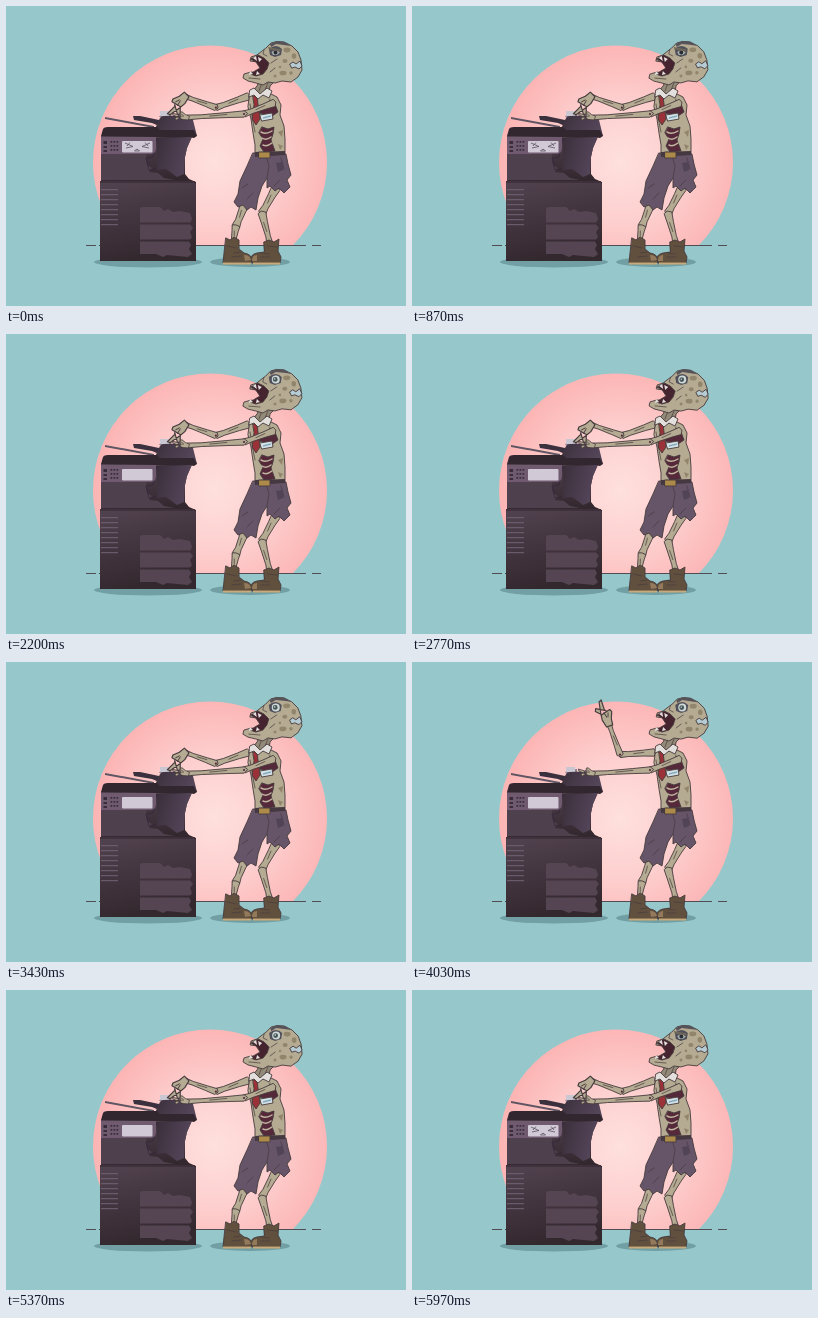
Animation of 400x300 px, one loop 6.11 s. Source, as an HTML page:

```html
<!DOCTYPE html>
<html lang="en">
<head>
<meta charset="utf-8">
<title>Zombie at the copier</title>
<style>
html, body { margin: 0; width: 100%; height: 100%; overflow: hidden; background: #96c8cb; }
svg { display: block; width: 100vw; height: 100vh; }
.ink { stroke: #463b3d; stroke-width: .9; stroke-linejoin: round; stroke-linecap: round; }
.skin { fill: #b5aa92; }
.line { fill: none; stroke: #463b3d; stroke-width: .7; stroke-linecap: round; stroke-linejoin: round; }
.wound { fill: #55293a; }
.bone { fill: #e2dfdc; }
.cloth { fill: #665469; }
.boot { fill: #62503f; }
.spot { fill: #91866b; }
</style>
</head>
<body>
<svg viewBox="0 0 400 300" xmlns="http://www.w3.org/2000/svg">
  <defs>
    <radialGradient id="sun" gradientUnits="userSpaceOnUse" cx="208" cy="156" r="118">
      <stop offset="0" stop-color="#fee0dd"/><stop offset=".5" stop-color="#fdd0cf"/><stop offset="1" stop-color="#fcb5b5"/>
    </radialGradient>
    <linearGradient id="cabinet" x1="0" x2=".25" y1="0" y2="1">
      <stop offset="0" stop-color="#524350"/><stop offset=".5" stop-color="#43353f"/><stop offset="1" stop-color="#34282f"/>
    </linearGradient>
    <linearGradient id="feeder" x1="0" x2="1" y1="0" y2=".3">
      <stop offset="0" stop-color="#3b2f3b"/><stop offset="1" stop-color="#55465a"/>
    </linearGradient>
    <clipPath id="horizon"><rect width="400" height="240"/></clipPath>
  </defs>

  <rect width="400" height="300" fill="#96c8cb"/>
  <circle cx="204" cy="156.5" r="117" fill="url(#sun)" clip-path="url(#horizon)"/>
  <path d="M80 239.5H90M93 239.5H300M306 239.5H315" stroke="#504c54" stroke-width="1.2"/>
  <g fill="#719fa4">
    <ellipse cx="142" cy="256" rx="54" ry="5.5"/>
    <ellipse cx="244" cy="256" rx="40" ry="5"/>
  </g>

  <g id="copier">
    <g id="lid">
      <path d="M127 110L134 110 153 114V120L146 117 128 114Z" fill="#3b303d"/>
      <path d="M99 111L148 120V122L99 113Z" fill="#5f5562"/>
      <path d="M153 111L155 108 165 107 165 112Z" fill="#8c8292"/>
      <path d="M154 105H163V110H154Z" fill="#c9c7d2"/>
      <path d="M148 125L154 112Q155 110 158 110L182 109Q186 110 187 114L191 130 150 131Z" fill="url(#feeder)"/>
    </g>
    <path d="M95 130H186L181 142 179 151V168L183 173 190 176V179H95Z" fill="url(#cabinet)"/>
    <path d="M95 130L97 123Q98 121 102 121H151L154 124H188L191 130 188 132 182 131 178 133 152 131Z" fill="#32272f"/>
    <path d="M151 132L186 131 181 142 179 151 178 168 171 171 160 163 151 164Z" fill="url(#feeder)"/>
    <path d="M95 147H140L141 159 146 162 143 166 152 167 158 172 168 174H95Z" fill="#4e404d"/>
    <path d="M151 132L147 151 140 152 143 164 150 163" fill="none" stroke="#33283a" stroke-width=".8"/>
    <path d="M94 175H188L190 178V255H94Z" fill="url(#cabinet)"/>
    <path d="M94 176H189" stroke="#30252e" stroke-width="1.2"/>
    <g id="vents" stroke="#716374" stroke-width="1"/>
    <g fill="#554552">
      <path d="M134 203Q134 201 137 201H154L158 205 162 203 167 206 174 205 184 207 186 213 184 216.5H134Z"/>
      <path d="M134 218.5H184L187 222 184 226 186 231 184 233.5H134Z"/>
      <path d="M134 235.5H183L185 239 183 243 186 248 182 251 161 249 157 251 150 248 134 248Z"/>
    </g>
    <path d="M95 131H150V142Q150 148 144 148H95Z" fill="#6f5a6f"/>
    <g id="keys" fill="#392d3c"/>
    <rect x="116" y="135" width="30.5" height="11.5" rx="1" fill="#d1cad6"/>
    <g id="screenFace" fill="none" stroke="#5b4f60" stroke-width=".8">
      <path d="M119 137L127 140.5L120 142M124 136.5L121 140M144 137L136 140.5L143 142M139 136.5L142 140M128.5 145Q131 141.5 133.5 145Z"/>
    </g>
  </g>

  <g id="farArm"></g>

  <g id="zombie">
    <g id="legs"></g>
    <g>
      <path class="boot ink" d="M220 232L224 234 228 231 233 234 233 243 238 247Q246 248 246 255L245 257H217L218 247Z"/>
      <path class="boot ink" d="M258 236L263 234 268 236 273 233 272 245 275 251 274 257H246Q242 249 251 247L258 246Z"/>
      <path d="M217 257.5H245M247 257.5H274" stroke="#c8aa7b" stroke-width="1.8"/>
      <path d="M238 249Q244 249 245 254L239 255ZM251 249Q246 249 246 255L251 255Z" fill="#937a5b"/>
      <path class="line" d="M221 240L230 242M228 247L235 246M226 251L235 250M262 240L271 241M256 247L263 248M255 251L264 251"/>
    </g>

    <path class="cloth ink" d="M247 147L280 148 282 158 285 169 281 174 284 181 278 187 273 182 269 185 264 180 261 182 261 172 256 180 252 192 250 204 245 201 241 204 237 199 232 201 228 196 232 188 234 175 241 160Z"/>
    <path class="line" d="M261 172L263 160 261 153M236 182L242 178M268 180L274 174M275 152L278 163M241 193L247 187"/>
    <path d="M270 157L277 156 277 164 272 166Z" fill="#514457"/>

    <path class="skin ink" d="M244 88L263 87 271 91 275 99 274 109 278 120 279 133 279 148 249 148 249 139 247 127 245 113 242 101Z"/>
    <path class="wound ink" d="M255 102L269 98 272 106 266 110 253 107ZM256 121L262 123 268 121 267 128 265 134 269 145 258 146 254 140 257 133 253 127Z"/>
    <g fill="none" stroke="#c0b49f" stroke-width="1.5" stroke-linecap="round">
      <path d="M255 126Q260 129 266 125M256 132Q260 135 265 131M257 139Q261 141 266 137"/>
    </g>
    <path class="spot" d="M272 126L277 124 276 131ZM272 138L277 140 274 144Z"/>
    <path d="M254 109L266 107 267 113 256 115Z" fill="#d7e2e8" class="ink"/>
    <path d="M257 112L265 110" stroke="#82aabd" stroke-width="1.5"/>
    <path d="M249 146L279 145V149L249 151Z" fill="#463840"/>
    <path d="M253 146H264V152H253Z" fill="#ad8a49" class="ink"/>
    <path d="M247 90L251 90 252 98 254 113 250 119 246 113 248 99Z" fill="#9b3237" class="ink"/>
    <path class="line" d="M244 98L247 116 249 126M264 93L262 100"/>

    <g id="head">
      <path d="M254 74L269 75 264 80 263 87 254 90 246 86 251 80Z" fill="#948a78" class="ink"/>
      <path class="line" d="M256 77L253 85M262 77L259 84"/>
      <path class="skin ink" d="M260 42L265 37 271 35.5 278 36 286 40 292 46 295 54 296 64 292 71 285 76 276 75 269 77 262 76 257 79 250 77 242 75 237 72 238 68 245 66 252 67 256 62 251 56 244 55 245 51 251 49 256 45Z"/>
      <path d="M245 53L252 49 258 52 263 57 261 63 257 68 250 70 244 68 249 65 254 62 250 56Z" fill="#45232f" class="ink"/>
      <path d="M247 52L250 50 251 55ZM252 51L256 53 253 56ZM243 69L244 65 247 68ZM250 69L251 65 254 68Z" class="bone"/>
      <path class="line" d="M258 44L257 48 261 50M264 66L269 62M265 57L271 53M243 72L254 73"/>
      <g class="spot">
        <ellipse cx="281" cy="44" rx="3.5" ry="2.4"/><ellipse cx="288" cy="50" rx="2.3" ry="2.8"/>
        <ellipse cx="279" cy="55" rx="2.5" ry="2"/><ellipse cx="277" cy="67" rx="3.5" ry="2.3"/>
        <circle cx="285" cy="67" r="1.7"/><circle cx="269" cy="70" r="1.5"/><circle cx="274" cy="61" r="1.3"/>
      </g>
      <path d="M264 38L271 35 279 36 285 40 278 39 270 38 265 41Z" fill="#56535a"/>
      <path d="M284 58L287 56 290 58 294 55 296 60 293 63 289 61 286 62Z" fill="#b6ccd5" class="ink"/>
      <path d="M263 43Q270 37 276 43L275 49 269 51 264 49Z" fill="#50505a"/>
      <g id="openEye">
        <circle cx="270" cy="45.5" r="4" fill="#cfdad7"/><circle cx="269.5" cy="45.5" r="2.4" fill="#46555a"/>
        <circle cx="269" cy="45" r=".7" fill="#fff"/>
      </g>
      <g id="squint">
        <path d="M265.5 46Q270 43 274 46.5L271 49 267 49Z" fill="#a8b1ac"/><circle cx="269.5" cy="46.5" r="2" fill="#292b35"/>
        <path d="M262 41L275 43.5 274 45.5 263 43.5Z" fill="#6f6759"/>
      </g>
    </g>
    <path class="bone ink" d="M244 84L248 82 254 88 261 82 266 85 263 92 257 89 252 93 248 89 243 91Z"/>
  </g>
  <g id="nearArm"></g>
</svg>
<script>
const LOOP = 6110;
const $ = id => document.getElementById(id);
const clamp = x => Math.max(0, Math.min(1, x));
const ease = x => x * x * (3 - 2 * x);
const ramp = (t, from, to) => ease(clamp((t - from) / (to - from)));
const mix = (a, b, k) => a + (b - a) * k;
const polar = ([x, y], deg, r) => [x + r * Math.cos(deg * Math.PI / 180), y + r * Math.sin(deg * Math.PI / 180)];
const show = (id, on) => $(id).setAttribute('visibility', on ? 'visible' : 'hidden');

$('vents').innerHTML = Array.from({ length: 8 }, (_, i) => `<path d="M95 ${183.7 + i * 5}H112"/>`).join('');
$('keys').innerHTML = Array.from({ length: 9 }, (_, i) =>
  `<rect x="${104.5 + i % 3 * 3}" y="${135 + Math.floor(i / 3) * 4}" width="1.7" height="1.7"/>`).join('') +
  '<path d="M97.500 135H101V138H97.500ZM97.500 140H101V142H97.500ZM97.500 144H101V146H97.500Z"/>';

// Tapered bone, wider at each joint, from a to b.
function bone(a, b, w1, w2) {
  const dir = Math.atan2(b[1] - a[1], b[0] - a[0]), nx = -Math.sin(dir), ny = Math.cos(dir);
  const at = (k, w) => [mix(a[0], b[0], k) + nx * w, mix(a[1], b[1], k) + ny * w].map(v => v.toFixed(2)).join(' ');
  return `<path class="skin ink" d="M${at(0, w1)}L${at(.3, w1 * .8)}L${at(.75, w2 * .75)}L${at(1, w2)}L${at(1.04, 0)}` +
    `L${at(1, -w2)}L${at(.75, -w2 * .8)}L${at(.3, -w1 * .8)}L${at(0, -w1)}L${at(-.06, 0)}Z"/>` +
    `<path class="line" d="M${at(.3, w1 * .2)}L${at(.6, 0)}"/>`;
}

function hand([x, y], deg, size) {
  return `<g transform="translate(${x} ${y}) rotate(${deg}) scale(${size})">
    <path class="skin ink" d="M-2 -2.5L4 -4 9 -3.5 18 -2 19 0 11 0 10 1 14 -6 12 -7 8 -3 10 4 8 5 3 3 -2 2.5Z"/>
    <path class="line" d="M9 -1L5 0M8 2L5 1"/></g>`;
}

const limb = (root, joint, end, width) =>
  bone(root, joint, width, width * .85) + bone(joint, end, width * .85, width * .65);

const arm = (shoulder, elbow, wrist, handAngle, handSize) =>
  limb(shoulder, elbow, wrist, 3.7) +
  `<circle class="wound" cx="${elbow[0]}" cy="${elbow[1]}" r="1.1"/>` + hand(wrist, handAngle, handSize);

$('legs').innerHTML = limb([270, 182], [256, 207], [264, 238], 4.6) + limb([239, 198], [230, 220], [227, 237], 4.6);
$('nearArm').innerHTML = arm([268, 97], [238, 108], [181, 111.5], 197, .8);

function draw(t) {
  const lift = ramp(t, 3810, 4000) * (1 - ramp(t, 4170, 4290));
  const reach = lift * (1 + .08 * Math.sin(Math.PI * clamp((t - 4000) / 170)));
  const shoulder = [242, 90.5];
  const elbow = polar(shoulder, mix(161, 176, reach), 34);
  const wrist = polar(elbow, mix(200, 248, reach), 33);
  $('farArm').innerHTML = arm(shoulder, elbow, wrist, mix(135, 247, reach), 1.3);

  const since = t - 4280;
  const jolt = since > 0 ? Math.exp(-since / 110) * Math.cos(since / 28) : 0;
  $('lid').setAttribute('transform', `rotate(${-jolt * 2} 188 125)`);
  $('copier').setAttribute('transform', `translate(0 ${jolt * .6})`);
  $('head').setAttribute('transform', `rotate(${.4 * Math.sin(t / LOOP * 10 * Math.PI)} 257 82)`);

  const broken = t >= 5760 || t < 1100;
  show('screenFace', broken);
  show('squint', broken);
  show('openEye', !broken);
}

const start = performance.now();
function tick() {
  draw((performance.now() - start) % LOOP);
  requestAnimationFrame(tick);
}
tick();
</script>
</body>
</html>
```
